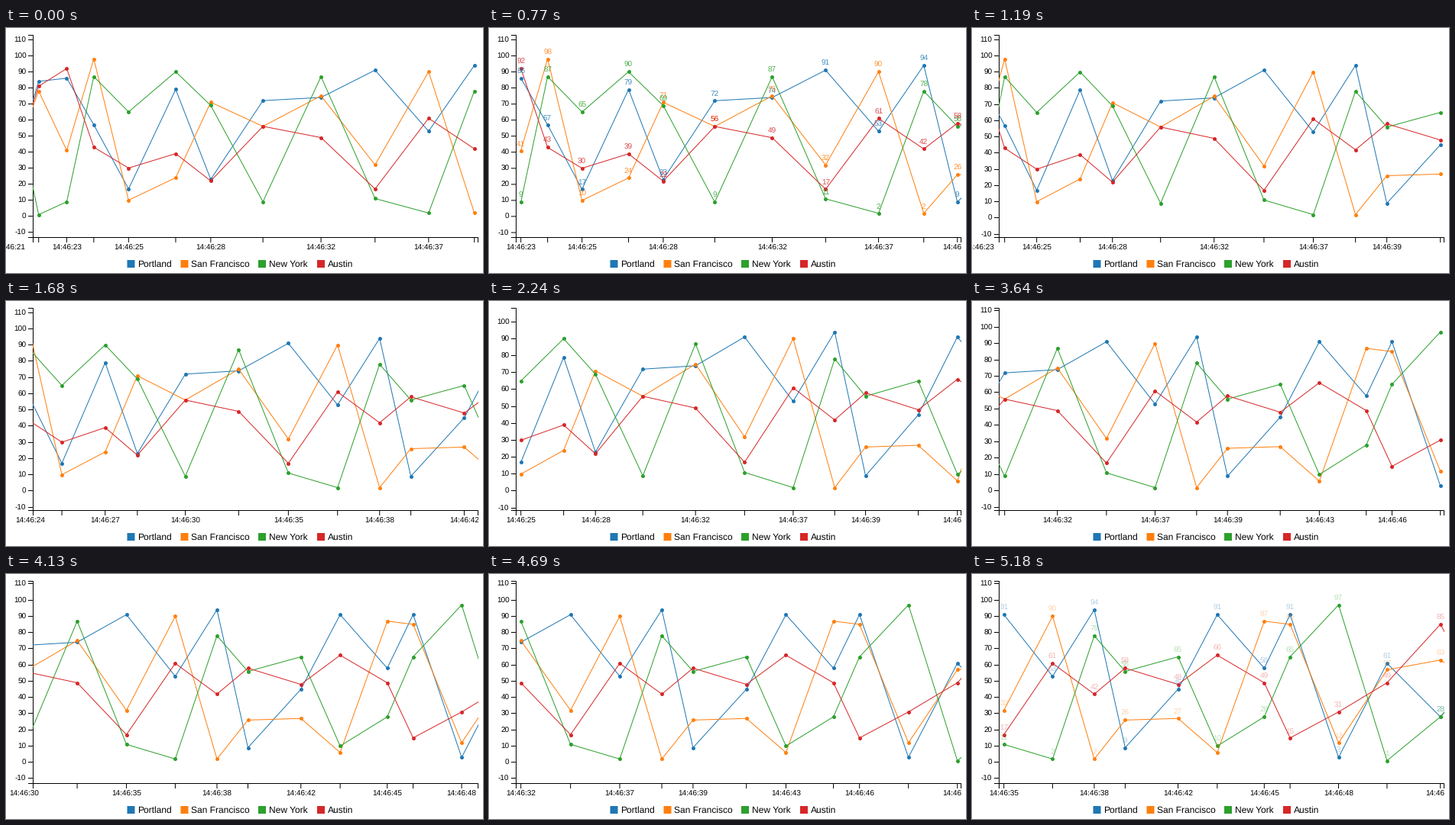
Recreate the animation shown at these times as a matplotlib script. Size 624 px wide and 321 px high, loop 5250 ms.

```python
from math import floor

import numpy as np
import matplotlib.pyplot as plt
from matplotlib.animation import FuncAnimation
from matplotlib.transforms import Bbox, TransformedBbox

W, H, DPI = 624, 321, 100
PX = 72 / DPI
FRAMES, STEP_MS = 75, 70

LEFT, RIGHT, TOP, BOTTOM = 35.5, 617.5, 9.5, 274.5
X_FIRST, X_LAST = 41.7, 612.7      # rest places of the outer points
Y_MAX, Y_MIN = 40.5, 244.5         # rows of the largest and smallest value
SPAN = 11                          # points in view

# Rhythm in animation steps: one new sample per PERIOD
PERIOD, FADE_DELAY, FADE_LEN, FLOW_RATE = 8.8, 1.3, 4.8, 0.37

# Colour, legend column and readings of each city
CITIES = {
    "Portland": ("#1f77b4", 158.5, [84, 86, 57, 17, 79, 23, 72, 74, 91, 53,
                                    94, 9, 45, 91, 58, 91, 3, 61, 28]),
    "San Francisco": ("#ff7f0e", 228.5, [78, 41, 98, 10, 24, 71, 56, 75, 32, 90,
                                         2, 26, 27, 6, 87, 85, 12, 57, 63]),
    "New York": ("#2ca02c", 330, [1, 9, 87, 65, 90, 69, 9, 87, 11, 2,
                                  78, 56, 65, 10, 28, 65, 97, 1, 28]),
    "Austin": ("#d62728", 407, [81, 92, 43, 30, 39, 22, 56, 49, 17, 61,
                                42, 58, 48, 66, 49, 15, 31, 49, 85]),
}
COLORS = [c[0] for c in CITIES.values()]

# Beyond the known readings each line swings back through the middle
known = np.array([c[2] for c in CITIES.values()], float)
swing = np.round(85 - 0.7 * known)
VALUES = np.hstack([swing[:, :1], known, swing[:, -1:]])

# Seconds between readings; the clock starts at 14:46:00
gaps = [1.05, 1.01, 1.3, 1.76, 1.31, 1.95, 2.17, 2.02, 2, 1.71,
        1.27, 2.17, 1.61, 1.93, 1.06, 1.99, 1.99, 2.19]
TIMES = 21.39 + np.cumsum([0, gaps[0], *gaps, gaps[-1]])

plt.rcParams["font.family"] = "Liberation Sans"
plt.rcParams["text.hinting"] = "no_hinting"
fig = plt.figure(figsize=(W / DPI, H / DPI), dpi=DPI, facecolor="white")
ax = fig.add_axes([0, 0, 1, 1])
ax.set_xlim(0, W)
ax.set_ylim(H, 0)
ax.axis("off")


def clip_box(x0, y0, x1, y1):
    return TransformedBbox(Bbox.from_extents(x0, y0, x1, y1), ax.transData)


PLOT_CLIP = clip_box(35, 4, 618, 275)
AXIS_CLIP = clip_box(0, 270, 618, 300)
moving = []


def keep(artist, clip=None):
    if clip is not None:
        artist.set_clip_path(None)
        artist.set_clip_box(clip)
        artist.set_clip_on(True)
    moving.append(artist)


def line(xs, ys, color="black", **kw):
    return ax.plot(xs, ys, color=color, lw=PX, snap=False, **kw)[0]


def text(x, y, s, size=10, **kw):
    return ax.text(x, y, s, fontsize=size * PX, va="baseline", **kw)


def ease(p):
    p = min(max(p, 0), 1)
    return 4 * p ** 3 if p < 0.5 else 1 - 4 * (1 - p) ** 3


def arrival(k):
    """Step at which window k has fully slid into place."""
    return floor(PERIOD * (k - 1))


def y_scale(k):
    """Rows for values, fitted to the samples held in window k."""
    part = VALUES[:, k:k + SPAN + 1]
    lo, hi = part.min(), part.max()
    return lambda v: Y_MIN - (v - lo) / (hi - lo) * (Y_MIN - Y_MAX)


def x_places(k, first):
    """Columns of all samples when window k spans first to X_LAST."""
    k = min(k, len(TIMES) - SPAN)
    t0, t1 = TIMES[k], TIMES[k + SPAN - 1]
    return first + (TIMES - t0) / (t1 - t0) * (X_LAST - first)


def draw_static():
    line([LEFT - 6, LEFT, LEFT, LEFT - 6], [TOP, TOP, BOTTOM, BOTTOM])
    line([LEFT, LEFT, RIGHT, RIGHT], [BOTTOM + 6, BOTTOM, BOTTOM, BOTTOM + 6])
    for name, (color, x, _) in CITIES.items():
        ax.add_patch(plt.Rectangle((x, 304), 10, 10, color=color, lw=0, snap=False))
        text(x + 14, 313, name, 12)


def draw_y_axis(old, new, e):
    for v in range(-10, 120, 10):
        a, b = floor(old(v)) + 0.5, floor(new(v)) + 0.5
        if not TOP <= b <= BOTTOM:
            continue
        alpha = 1 if TOP <= a <= BOTTOM else e
        y = a + (b - a) * e
        keep(line([LEFT - 6, LEFT], [y, y], alpha=alpha))
        keep(text(26.5, y + 3.5, str(v), ha="right", alpha=alpha))


def draw_x_axis(xs, k):
    for i in range(k, k + SPAN + 1):
        if LEFT < xs[i] < RIGHT:
            keep(line([xs[i]] * 2, [BOTTOM, BOTTOM + 6]))
        if (i - k) % 2 == 0:
            label = f"14:46:{int(TIMES[i]):02d}"
            keep(text(xs[i], 290.7, label, ha="center"), AXIS_CLIP)


def update(f):
    while moving:
        moving.pop().remove()
    k = 0
    while f >= arrival(k + 1) + FADE_DELAY:
        k += 1
    e = ease((f - arrival(k) - FADE_DELAY) / FADE_LEN)
    flow = min(max(1 - FLOW_RATE * (arrival(k + 1) - f), 0), 1)

    # The slide stops a pixel short, then the new window snaps into place
    xs = (x_places(k, X_FIRST) * (1 - flow)
          + x_places(k + 1, X_FIRST + 1) * flow)
    old, new = y_scale(max(k - 1, 0)), y_scale(k)
    ys = old(VALUES) * (1 - e) + new(VALUES) * e
    view = slice(k, k + SPAN + 1)

    draw_y_axis(old, new, e)
    draw_x_axis(xs, k)
    for color, row in zip(COLORS, ys):
        keep(line(xs[view], row[view], color), PLOT_CLIP)
        keep(line(xs[view], row[view], color, ls="", marker="o",
                  ms=5 * PX, mew=0), PLOT_CLIP)
    if e < 0.995:
        for color, row, vals in zip(COLORS, ys, VALUES):
            for i in range(k, k + SPAN + 1):
                keep(text(xs[i], row[i] - 6, f"{vals[i]:.0f}", ha="center",
                          color=color, alpha=1 - e), PLOT_CLIP)
    return moving


draw_static()
anim = FuncAnimation(fig, update, frames=FRAMES, interval=STEP_MS,
                     init_func=lambda: [], repeat=True, repeat_delay=0)
plt.show()
```
